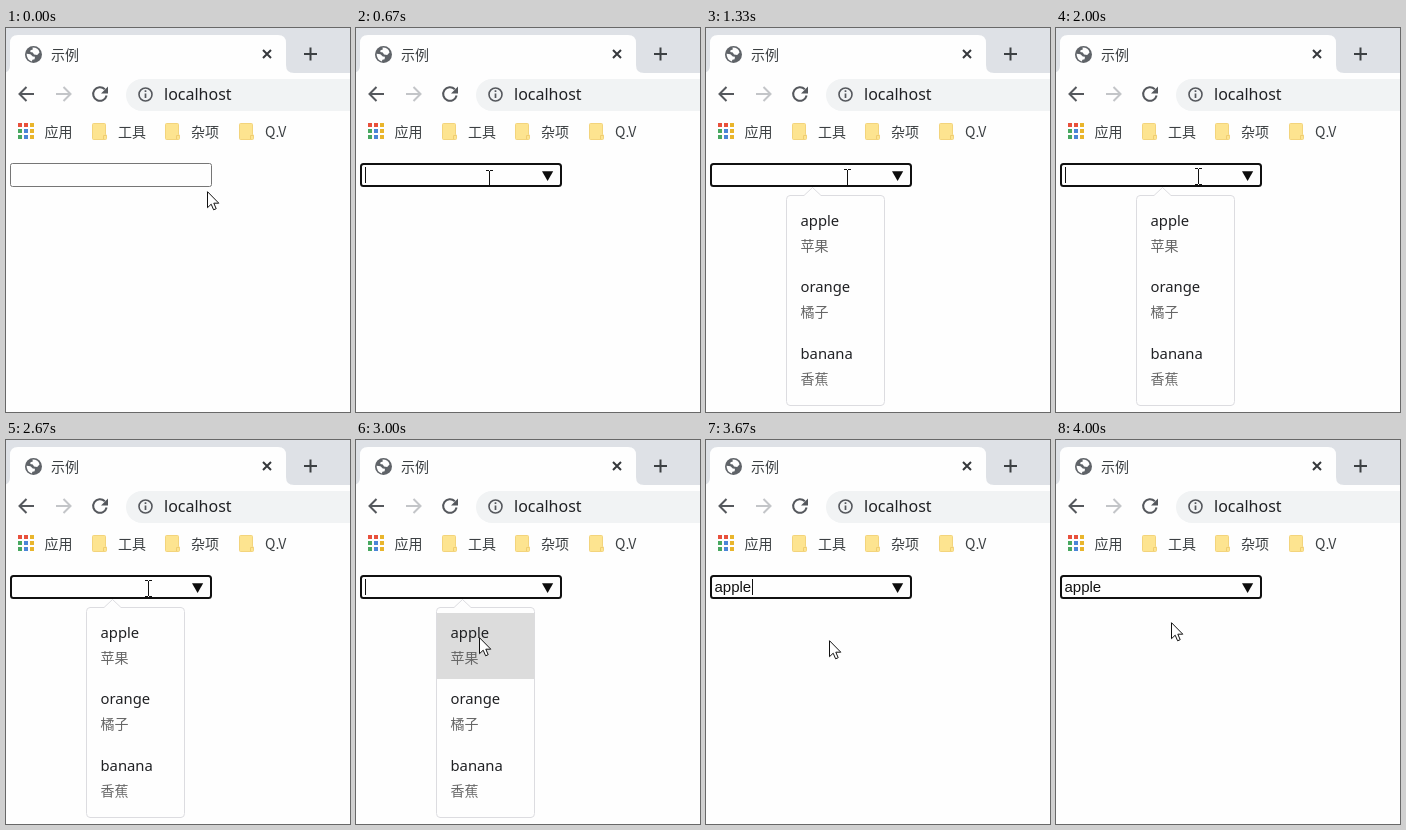
Recreate the animation shown at these times as an HTML page. Size 344x384 px, loop 4.33 s.

```html
<!DOCTYPE html>
<html lang="zh-CN">
<head>
<meta charset="utf-8">
<title>示例</title>
<style>
  html, body { margin: 0; width: 100%; height: 100%; overflow: hidden; background: #fefefe; }
  svg { display: block; width: 344px; height: 384px; }
  text { font-family: "Noto Sans", "Noto Sans CJK SC", "Noto Sans CJK", sans-serif; fill: #202124; }
  .zh { font-family: "Noto Sans CJK SC", "Noto Sans CJK", sans-serif; font-size: 14px; fill: #3c4043; }
  .sub { fill: #666; }
  .item { font-size: 14.8px; }
  .line { fill: none; stroke: #55585d; stroke-width: 2; }
</style>
</head>
<body>
<svg viewBox="0 0 344 384">
  <rect width="344" height="384" fill="#fefefe"/>

  <!-- tab strip -->
  <rect width="344" height="45" fill="#dee1e6"/>
  <path d="M-4 45q8 0 8-8V15q0-8 8-8H272q8 0 8 8V37q0 8 8 8Z" fill="#fefefe"/>
  <circle cx="27.5" cy="26.500" r="8.500" fill="#5f6368"/>
  <path d="M26.5 19.600q6 0 7 5l-2.300 2.400-3.200-.6-1.200-2-2.500-.4.2-1.800 2.300-.6Z M20.600 25.800l3.800.4 2.400 2.200 2.200.4-.4 2.400-2.200.6-.6 1.600q-5.200-1.600-5.200-7.600Z" fill="#fefefe"/>
  <text class="zh" x="45" y="31.500">示例</text>
  <path class="line" d="M257 22l8 8m0-8l-8 8" style="stroke:#35383c"/>
  <path class="line" d="M298 26h13M304.500 19.500v13" style="stroke:#3c4043"/>

  <!-- toolbar -->
  <path class="line" d="M28 66H14M20.500 59l-7 7 7 7"/>
  <path class="line" d="M50 66H64M57.500 59l7 7-7 7" style="stroke:#c3c5c8"/>
  <path class="line" d="M98.800 61.200A6.800 6.800 0 1 0 100.600 67.500"/>
  <path d="M102 58.500v7h-7Z" fill="#55585d"/>
  <path d="M344 51H136a16 16 0 0 0 0 32H344Z" fill="#f1f3f4"/>
  <circle class="line" cx="139.500" cy="66.500" r="6.500" style="stroke-width:1.600"/>
  <path class="line" d="M139.500 65.500v4.500M139.500 62.300v1.800" style="stroke-width:1.700"/>
  <text x="158" y="72" font-size="16">localhost</text>

  <!-- bookmarks -->
  <g id="apps"></g>
  <text class="zh" x="38.500" y="109">应用</text>
  <g id="folders"></g>

  <!-- input -->
  <rect id="idle" x="4.500" y="135.500" width="201" height="23" rx="2" fill="#fefefe" stroke="#767676"/>
  <g id="focus">
    <rect x="5" y="136" width="200" height="22" rx="2.500" fill="#fefefe" stroke="#101010" stroke-width="2"/>
    <path d="M186 143.200H197.200L191.600 153Z" fill="#0c0c0c"/>
  </g>
  <text id="value" x="8.500" y="152" font-size="15" style="font-family:'Liberation Sans',Arial,sans-serif;fill:#111">apple</text>
  <rect id="caret" x="9" y="139" width="1" height="16" fill="#111"/>

  <!-- suggestions -->
  <g id="list">
    <path d="M84 167.500H98l8.500-8 8.500 8H175a3.500 4 0 0 1 3.500 4V373.500a3.500 4 0 0 1-3.500 4H84a3.500 4 0 0 1-3.500-4V171.500a3.500 4 0 0 1 3.500-4Z" fill="#fefefe" stroke="#dcdce0"/>
    <rect id="hover" x="81" y="173" width="97.500" height="66" fill="#dcdcdc"/>
    <g id="items"></g>
  </g>

  <!-- pointers -->
  <g id="arrow">
    <path d="M.5 .7V16.700L4.200 13.200 6.600 18.800 9.200 17.700 6.800 12.200H11.800Z" fill="#fff" stroke="#111"/>
  </g>
  <g id="beam">
    <path d="M-3 -7.500H0M1 -7.500H4M.5 -7V8M-3 8.500H0M1 8.500H4" fill="none" stroke="#111"/>
  </g>
</svg>
<script>
const LOOP = 4330;
const $ = id => document.getElementById(id);

function add(parent, tag, attrs, label = "") {
  const el = document.createElementNS("http://www.w3.org/2000/svg", tag);
  for (const key in attrs) el.setAttribute(key, attrs[key]);
  el.textContent = label;
  return parent.appendChild(el);
}

["#e8503c", "#e8503c", "#e9b52c", "#48a860", "#4a86d8", "#e9b52c", "#48a860", "#4a86d8", "#e9b52c"]
  .forEach((fill, i) => add($("apps"), "rect", {
    x: 12 + i % 3 * 6, y: 95 + Math.floor(i / 3) * 6, width: 4, height: 4, fill
  }));

["工具", "杂项", "Q.V"].forEach((label, i) => {
  const x = 86.5 + Math.floor(i * 73.5);
  add($("folders"), "path", {
    d: `M${x} 96.5q0-1 1-1H${x + 12}q1 0 1 1V106l1 2V110.500q0 1-1 1H${x + 1}q-1 0-1-1Z`,
    fill: "#fde490", stroke: "#f3d47c"
  });
  add($("folders"), "path", { d: `M${x + 11} 111V107.500H${x + 14}`, fill: "none", stroke: "#f0cd70" });
  add($("folders"), "text", { class: "zh", x: x + 25.5, y: 109 }, label);
});

[["apple", "苹果"], ["orange", "橘子"], ["banana", "香蕉"]].forEach(([en, zh], i) => {
  const y = Math.floor(198 + i * 66.5);
  add($("items"), "text", { class: "item", x: 94.5, y }, en);
  add($("items"), "text", { class: "zh sub", x: 94.5, y: y + 25 }, zh);
});

// Each row is [start in ms, value], held until the next row.
function hold(el, prop, rows) {
  const frames = rows.map(([ms, value]) => ({ offset: ms / LOOP, [prop]: value, easing: "step-end" }));
  frames.push({ offset: 1, [prop]: rows[rows.length - 1][1] });
  el.animate(frames, { duration: LOOP, iterations: Infinity });
}

const show = (id, ...rows) => hold($(id), "opacity", rows);
const move = (id, ...rows) =>
  hold($(id), "transform", rows.map(([ms, x, y]) => [ms, `translate(${x}px, ${y}px)`]));

show("idle", [0, 1], [670, 0]);
show("focus", [0, 0], [670, 1]);
show("value", [0, 0], [3330, 1]);
show("caret", [0, 0], [670, 1], [1330, 0], [1670, 1], [2330, 0], [3000, 1], [4000, 0]);
move("caret", [0, 0, 0], [3330, 37, 0]);
show("list", [0, 0], [1000, 1], [3330, 0.75], [3670, 0]);
show("hover", [0, 0], [3000, 1]);
show("arrow", [0, 1], [670, 0], [3000, 1]);
move("arrow", [0, 201, 163], [3000, 123, 197], [3670, 123, 200], [4000, 115, 182]);
show("beam", [0, 0], [670, 1], [3000, 0]);
move("beam", [0, 133, 150], [1000, 141, 149], [1670, 142, 148]);
</script>
</body>
</html>
```
